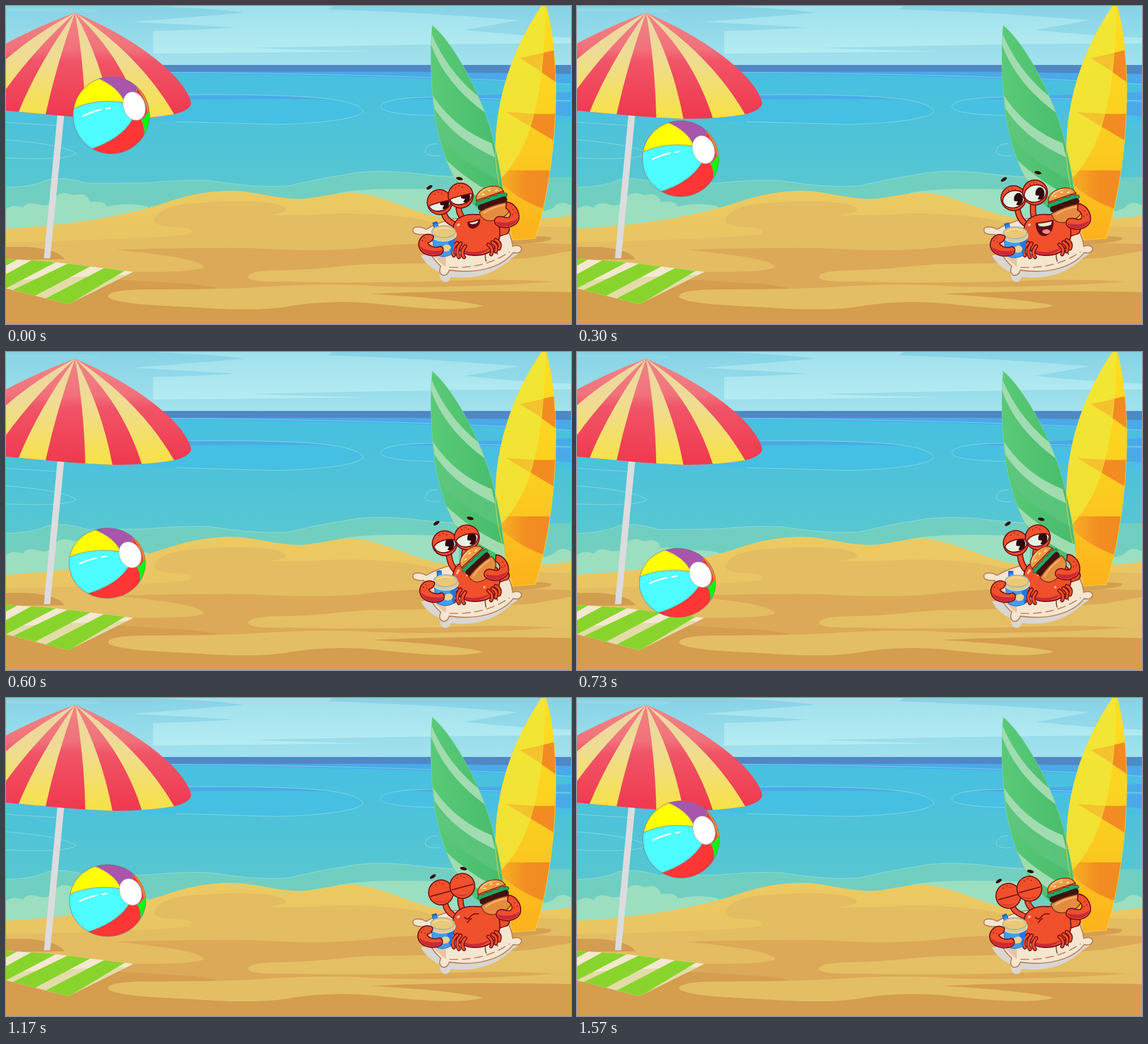
Animation, 998 px wide and 561 px high, one loop 1.6 s. Source, as an HTML page:

```html
<!DOCTYPE html>
<html lang="en">
<head>
<meta charset="utf-8">
<title>Crab on the beach</title>
<style>
html, body { margin: 0; width: 100%; height: 100%; overflow: hidden; }
svg { display: block; width: 100vw; height: 100vh; }
.crab { fill: #f0502b; stroke: #6e0b13; stroke-width: 1.8; stroke-linejoin: round; stroke-linecap: round; }
.dark { fill: #c9283a; }
.line { fill: none; stroke: #6e0b13; stroke-width: 1.8; stroke-linecap: round; }
.foam { fill: none; stroke: #a5e3e6; stroke-width: 1; opacity: .65; }
.pillow { fill: #f5e6d0; stroke: #b67c58; stroke-width: 1.8; }
.seam { fill: none; stroke: #b67c58; stroke-width: 1.7; stroke-linecap: round; }
.bun { stroke: #7a3014; stroke-width: 1.5; }
</style>
</head>
<body>
<svg viewBox="0 0 998 561" preserveAspectRatio="none">
<defs>
  <linearGradient id="sky" x2="0" y2="1"><stop stop-color="#86d3e6"/><stop offset="1" stop-color="#a3e2ed"/></linearGradient>
  <linearGradient id="cloud" x2="0" y2="1"><stop stop-color="#9fe0ed"/><stop offset="1" stop-color="#b5ecf2"/></linearGradient>
  <linearGradient id="sea" x2="0" y2="1"><stop stop-color="#46bfe2"/><stop offset=".4" stop-color="#4fc3d8"/><stop offset="1" stop-color="#62cbc9"/></linearGradient>
  <linearGradient id="sand" gradientUnits="userSpaceOnUse" x1="0" y1="326" x2="0" y2="535"><stop stop-color="#ecca62"/><stop offset="1" stop-color="#e4be64"/></linearGradient>
  <linearGradient id="red" gradientUnits="userSpaceOnUse" x1="0" y1="12" x2="0" y2="190"><stop stop-color="#f18684"/><stop offset=".36" stop-color="#f1717a"/><stop offset=".48" stop-color="#f15467"/><stop offset="1" stop-color="#f03a50"/></linearGradient>
  <linearGradient id="yellow" gradientUnits="userSpaceOnUse" x1="0" y1="12" x2="0" y2="190"><stop stop-color="#ecd5a6"/><stop offset=".45" stop-color="#efdc92"/><stop offset="1" stop-color="#f7e14a"/></linearGradient>
  <linearGradient id="green"><stop stop-color="#5bcb77"/><stop offset="1" stop-color="#45ba6c"/></linearGradient>
  <linearGradient id="gold" x2="0" y2="1"><stop stop-color="#fee020"/><stop offset=".6" stop-color="#fbcb20"/><stop offset="1" stop-color="#fdb01c"/></linearGradient>
  <linearGradient id="orange"><stop stop-color="#f8b323"/><stop offset=".5" stop-color="#f28d22"/><stop offset="1" stop-color="#f28a22"/></linearGradient>
  <clipPath id="canopy"><path d="M122 12C185 38 255 78 300 126Q325 155 327 172Q325 184 297 191Q244 200 188 199Q130 197 70 191L-90 176V105Q-20 80 0 66Q65 32 122 12Z"/></clipPath>
  <clipPath id="towel"><path d="M0 446L80 451L225 469L110 526L0 498Z"/></clipPath>
  <clipPath id="boardA"><path id="shapeA" d="M753 34C790 65 837 150 858 225Q878 300 882 368Q845 375 820 345C785 305 762 240 755 175Q747 90 753 34Z"/></clipPath>
  <clipPath id="boardB"><path id="shapeB" d="M946 0H954C972 65 975 150 967 240Q957 340 935 410L895 413C880 350 862 300 865 240C868 145 905 60 946 0Z"/></clipPath>
  <clipPath id="round"><circle r="67.5"/></clipPath>
  <clipPath id="slitL"><path id="cutL"/></clipPath>
  <clipPath id="slitR"><path id="cutR"/></clipPath>
</defs>

<!-- sky -->
<path d="M0 0H998V106H0Z" fill="url(#sky)"/>
<path d="M223 28L420 12Q380 5 260 0H578L568 6Q720 10 905 25Q860 34 810 42Q900 52 998 56V66Q760 66 435 74Q530 78 650 80L260 84V44Q330 43 405 38Q310 32 223 28Z" fill="url(#cloud)"/>
<path d="M0 6H130Q175 7 155 10L0 8" class="foam"/>

<!-- sea -->
<path d="M0 104H998V420H0Z" fill="url(#sea)"/>
<path d="M0 104H998V120L700 117H0Z" fill="#4f88c5"/>
<path d="M0 116H700L998 120V138Q720 124 260 118Z" fill="#4aaae8"/>
<path d="M240 156L420 157Q540 158 590 168Q440 165 240 167ZM690 165Q740 160 998 152V170Q790 168 675 169Z" fill="#4aaae8"/>
<path d="M240 166Q540 161 590 167Q630 177 631 187Q610 205 480 209L240 202Z" fill="#46c0e2"/>
<path d="M662 179Q664 164 700 164Q850 167 998 167V207Q850 196 690 191Q668 188 662 179Z" fill="#48c0e2"/>
<path d="M870 175Q940 167 998 170V195Q940 190 870 185Z" fill="#4aaae8"/>
<path class="foam" d="M262 117Q720 120 998 138M300 157Q540 154 600 169Q630 177 631 187Q610 205 480 209L300 204M0 205Q55 209 96 211M998 167Q850 164 750 161Q660 162 662 179Q670 192 760 193M0 236Q100 244 124 260Q110 273 0 268M762 243Q742 242 740 258Q746 266 768 264"/>
<path d="M0 320Q48 319 75 306Q100 300 145 313L250 312Q310 306 360 308Q450 322 500 317Q570 301 590 299Q640 287 710 294Q790 304 998 302V400H0Z" fill="#71cfc1"/>
<path class="foam" d="M0 320Q48 319 75 306Q100 300 145 313L250 312Q310 306 360 308Q450 322 500 317Q570 301 590 299Q640 287 710 294Q760 300 790 302"/>
<path d="M0 358Q15 348 30 356Q36 343 60 351Q75 354 82 345Q92 323 120 334Q143 327 148 346Q174 342 178 354Q215 345 250 354L280 395H0ZM586 330Q640 320 740 323L800 325V390H600ZM940 364Q962 360 968 355Q980 341 998 352V390H940Z" fill="#9bdfc0"/>

<!-- sand -->
<path d="M0 393Q120 386 200 368Q250 358 290 344Q345 326 397 326C440 326 480 342 525 340C560 337 580 329 613 329C655 332 700 354 740 366Q800 383 860 377Q930 379 998 370V561H0Z" fill="url(#sand)"/>
<path d="M0 417Q290 410 325 402Q335 393 310 391Q258 389 262 378Q268 355 320 349Q420 340 475 349Q505 358 490 363Q475 369 450 369Q530 370 590 366Q700 366 760 383L998 390V561H0Z" fill="#e4bc62"/>
<path d="M0 425H40Q95 430 103 447L0 448Z" fill="#d29d50"/>
<path d="M194 430Q330 426 430 427Q560 435 640 426Q730 413 998 420V500H0V474Q150 470 225 469Q325 470 349 462Q352 453 300 443Q245 435 194 430Z" fill="#dba957"/>
<path d="M427 478Q428 467 480 466C560 466 600 455 665 455Q760 455 930 444Q998 432 998 432V488Q880 480 780 485Q600 490 500 486Q430 488 427 478Z" fill="#e5bf64"/>
<path d="M0 485Q180 478 260 487Q340 489 375 498L190 510Q210 527 330 531Q450 541 510 528Q620 516 700 525L844 528L998 500V561H0Z" fill="#d59d4e"/>
<path d="M180 513Q180 500 250 500Q360 500 430 497Q560 488 650 494Q800 500 998 484V505Q790 502 645 508Q800 517 843 529Q800 541 680 528Q580 515 500 530Q440 540 320 531Q190 526 180 513Z" fill="#e4be64"/>
<path d="M645 508Q800 500 998 505V561H0V530Q200 524 320 531Q440 540 500 530Q580 515 680 530Q800 541 843 529Q800 517 645 508Z" fill="#d59d4e"/>
<path d="M885 411Q930 403 962 408Q970 414 930 418L890 422Z" fill="#d4a050"/>

<!-- surfboards -->
<g clip-path="url(#boardB)">
  <path d="M860 0H980V420H860Z" fill="url(#gold)"/>
  <path d="M908 92L968 78L972 135Q940 112 908 92ZM884 187Q930 192 972 190V240Q930 215 884 187ZM870 290H964L950 358Q900 340 870 308Z" fill="url(#orange)"/>
  <path d="M952 0Q953 130 926 215Q908 270 873 306L850 270V0Z" fill="#efea3c" opacity=".72"/>
  <path d="M908 92L949 83Q947 103 943 113ZM884 187L932 190Q928 205 923 211Z" fill="#f5c02b" opacity=".8"/>
</g>
<g clip-path="url(#boardA)">
  <path d="M740 30H890V380H740Z" fill="url(#green)"/>
  <path d="M757 185Q800 233 865 265L874 310Q800 270 770 235Z" fill="#62c681" opacity=".65"/>
  <path d="M750 45Q778 114 835 160L846 188Q774 135 750 66ZM754 158Q792 216 858 242L864 267Q790 233 757 181ZM772 266Q820 314 880 340L884 365Q812 330 782 292Z" fill="#a1dcb0"/>
</g>
<use href="#shapeA" fill="none" stroke="#7ad79a" stroke-width=".8"/>
<use href="#shapeB" fill="none" stroke="#f7dc45" stroke-width=".8"/>

<!-- towel and umbrella -->
<g clip-path="url(#towel)">
  <path d="M0 440H230V530H0Z" fill="#f4e8d0"/>
  <path d="M0 485Q80 479 225 474V530H0Z" fill="#e3dca8"/>
  <path d="M0 446H22L0 458ZM46 448L88 452L0 498V473ZM110 454L150 459L48 513L10 502ZM174 462L210 467L110 527L68 517Z" fill="#89d42c"/>
</g>
<path d="M91 190H103L78 445H67Z" fill="#dcdcde"/>
<g clip-path="url(#canopy)"><path d="M-100 0H340V210H-100Z" fill="url(#red)"/><g id="stripes" fill="url(#yellow)"/></g>

<!-- ball -->
<g id="ball">
  <circle r="67.5" fill="#ff3536"/>
  <g clip-path="url(#round)" stroke="#8f9196" stroke-width="1">
    <path d="M-70 -10C-40 -27 0 -29 27 -20Q34 -5 37 8Q16 43 -39 60L-75 50Z" fill="#4dfdff"/>
    <path d="M-75 -8C-40 -26 -5 -27 23 -22Q20 -48 -22 -65L-75 -75Z" fill="#ffff00"/>
    <path d="M-24 -65Q12 -50 23 -24Q28 -40 44 -40L46 -49L20 -75Z" fill="#a855ac"/>
    <path d="M42 -54Q52 -40 58 -27Q65 -12 64 2H80V-55Z" fill="#ff8516"/>
    <path d="M58 5Q63 -6 72 -8V30L56 42Q62 23 52 7Z" fill="#00ff00"/>
    <path d="M40 -41Q57 -22 57 8" fill="none"/>
  </g>
  <ellipse cx="40.5" cy="-16" rx="19" ry="25.5" transform="rotate(-19 40.5 -16)" fill="#fff" stroke="#aaa" stroke-width=".8"/>
  <path d="M-49 1Q-35 -6 -19 -10M-9 -11.500L-2 -13" fill="none" stroke="#fff" stroke-width="3" stroke-linecap="round"/>
  <circle r="67.5" fill="none" stroke="#777" stroke-width=".8"/>
</g>

<!-- pillow -->
<path d="M733 440Q742 458 766 470Q766 490 781 486L786 478Q850 486 893 445L905 437L880 420Z" fill="#d9d6d3"/>
<path class="pillow" d="M738 403Q728 404 720 400Q716 392 724 390Q734 389 742 394C790 365 860 368 882 390Q893 405 895 424Q908 420 911 428Q909 438 896 435C875 462 830 473 783 466Q780 476 771 475Q763 470 768 459Q744 438 738 403Z"/>
<path class="seam" d="M784 461Q845 464 889 434" stroke-dasharray="14 8"/>
<path d="M740 414Q752 440 771 456L777 460V430Z" fill="#e7c4a4"/>
<path class="seam" d="M848 450Q844 437 850 430M868 438Q866 432 870 428" style="stroke:#6e3b28"/>

<!-- eye stalks, arm, body -->
<path id="stalkA" fill="none" stroke="#6e0b13" stroke-width="11"/>
<path id="stalkB" fill="none" stroke="#f0502b" stroke-width="7.500"/>
<path class="crab" d="M862 398Q872 386 887 388Q892 396 885 402Q873 405 864 410Z"/>
<g id="eyes"></g>
<path class="crab" d="M790 390C793 373 811 366 832 368C855 367 871 378 872 395C875 422 857 441 826 440C802 440 783 420 790 390Z"/>
<path d="M798 425Q824 443 858 425Q842 440 822 439Q805 437 798 425Z" class="dark"/>
<ellipse cx="799" cy="386" rx="3" ry="2" fill="#ffc5a5" transform="rotate(-35 799 386)"/>
<g id="legs"></g>
<g id="mouth">
  <path id="hole" fill="#5d0d18" stroke="#6e0b13" stroke-width="1.6"/>
  <path id="teeth" fill="#d9f0d4"/>
  <ellipse id="tongue" fill="#f58c80"/>
</g>
<path id="frown" class="line" d="M810 387Q816 393 820 386Q825 379 834 381M815 396Q818 391 822 389"/>

<g id="burger">
  <path class="bun" d="M-25 -13C-25 -34 24 -34 25 -13Z" fill="#f09a45"/>
  <path d="M-17 -21Q-8 -28 5 -26" fill="none" stroke="#f8c171" stroke-width="3" stroke-linecap="round"/>
  <path d="M-12 -19h3M1 -22h3M12 -18h3" stroke="#fff0c8" stroke-width="2" stroke-linecap="round"/>
  <path d="M-26 -13H26L24 -7H-25Z" fill="#e94b2c" stroke="#6e1b12"/>
  <path d="M-29 -7Q-24 -14 -18 -9Q-10 -13 -4 -9Q5 -14 10 -9Q18 -14 23 -9Q31 -10 29 -3Q20 1 15 -4Q8 2 1 -4Q-7 2 -13 -3Q-24 2 -29 -7Z" fill="#1fa866" stroke="#0e633f"/>
  <rect x="-27" y="-4" width="54" height="11" rx="5" fill="#42120f"/>
  <path d="M-26 8H26L17 10L8 14L-2 9Z" fill="#f8bf42"/>
  <path class="bun" d="M-27 8C-29 25 -16 31 0 31C17 31 29 25 27 8Q0 3 -27 8Z" fill="#e58c40"/>
  <path d="M-20 12Q0 7 19 11" fill="none" stroke="#f6b36b" stroke-width="2.500" stroke-linecap="round"/>
</g>
<g id="crumbs" fill="#f2c985"><circle cx="797" cy="390" r="2"/><circle cx="814" cy="394" r="1.600"/><circle cx="845" cy="415" r="2"/></g>
<g id="clawR">
  <path class="crab" d="M-2 -23C11 -23 22 -8 20 7C16 20 -3 26 -17 19C-25 15 -25 7 -18 3C-10 0 -5 6 2 4C7 0 5 -8 -3 -12Z"/>
  <path class="dark" d="M18 6Q3 17 -21 11Q-18 19 -7 20Q13 20 18 6Z"/>
  <path d="M9 -11l1 2M13 -5l1 2M8 -2l1 2" stroke="#8f1717" stroke-width="1.500"/>
</g>

<g id="cup">
  <g id="straw"><path d="M-3.500 -20H4V4H-3.500Z" fill="#318ded" stroke="#1d57ad" stroke-width="1.300"/><ellipse cx=".2" cy="-19" rx="3.500" ry="2" fill="#2467c7"/></g>
  <path d="M-21 5L-15 39Q0 47 14 39L21 5Z" fill="#419df0" stroke="#2770c4" stroke-width="1.300"/>
  <path d="M8 17L13 39L14 39L20 10Z" fill="#2675dc"/>
  <ellipse cx="5" cy="28" rx="8" ry="6" fill="#ecd18c" transform="rotate(-15 5 28)"/>
  <ellipse cy="4" rx="22.500" ry="12" fill="#dcc98f" stroke="#cfe0df" stroke-width="1.400"/>
  <ellipse cy="-1" rx="21" ry="10.500" fill="#eac878" stroke="#8faeba" stroke-width="1.300"/>
  <path d="M-16 -3Q-3 -11 13 -5" fill="none" stroke="#f5e6b9" stroke-width="1.300"/>
</g>
<g id="clawL">
  <path class="crab" d="M752 404C739 399 728 410 729 423C732 438 750 444 766 439C775 435 774 425 767 424C759 428 748 424 745 418Q753 416 755 409Q756 405 752 404Z"/>
  <path class="dark" d="M731 424Q745 435 771 431Q769 437 761 439Q738 441 731 424Z"/>
  <path d="M735 413l1 2M739 409l1 1M741 415l1 1" stroke="#8f1717" stroke-width="1.700"/>
</g>
<g id="brows" fill="#35080d"><ellipse id="browL" rx="6" ry="2.800"/><ellipse id="browR" rx="6" ry="2.800"/></g>
</svg>

<script>
const LOOP = 1600, LAST = 1570;
const $ = id => document.getElementById(id);
const set = (id, name, value) => $(id).setAttribute(name, value);
const place = (id, x, y, rot = 0, extra = '') =>
  set(id, 'transform', `translate(${x} ${y}) rotate(${rot}) ${extra}`);

const times = [0, 300, 470, 730, 970, 1170, LAST];
const keys = {
  ballX: [186, 183, 180.5, 177.5, 177, 179.5, 184],
  ballY: [192.5, 269, 328, 407, 417, 357.5, 249.5],
  ballR: [68, 67, 64, 61, 61, 63.5, 68],
  eyeLX: [766, 771, 775, 775, 773, 768.5, 762],
  eyeLY: [346, 339, 338, 337, 340, 343, 349],
  eyeRX: [803, 809, 814, 814, 811, 806, 799],
  eyeRY: [334.5, 329, 327.5, 327, 331, 331.5, 336.5],
  lidTop: [0, -18, -8, -8, 0, 2, 2],
  lidBottom: [20, 22, 21, 20, 9, 2, 2],
  browLX: [748, 754, 759, 761, 762, 754, 745],
  browLY: [320, 306, 302, 303, 311, 315, 323],
  browRX: [801, 814, 820, 820, 817, 808, 801],
  browRY: [304.5, 294, 293, 295, 302, 301, 306],
  burgerX: [859, 861, 838, 831, 838, 862, 860],
  burgerY: [347, 350, 369, 373, 370, 350, 347],
  burgerRot: [-19, -19, -35, -46, -37, -20, -19],
  clawX: [886, 887, 870, 868, 871, 889, 887],
  clawY: [369, 372, 382, 380, 382, 371, 369],
  cupX: [773, 774, 775.5, 777, 776.5, 771, 773],
  cupY: [399, 401, 403, 405, 404, 399, 399],
  strawX: [-10, -10, -10, -11, -11, -10, -11],
  strawRot: [-17, -16, -10, 0, 0, -14, -22],
  grip: [0, 1, 1.5, 2, 1.5, -1.5, 0],
  mouth: [.25, 1, .8, .4, .1, 0, 0]
};

// Hermite curve through the keys; turning points stay flat unless loose.
function curve(v, t, loose) {
  let i = 0;
  while (i < times.length - 2 && t >= times[i + 1]) i++;
  const slope = k => {
    const a = Math.max(k - 1, 0), b = Math.min(k + 1, v.length - 1);
    if (!loose && a < k && k < b && (v[k] - v[a]) * (v[b] - v[k]) <= 0) return 0;
    return (v[b] - v[a]) / (times[b] - times[a]);
  };
  const d = times[i + 1] - times[i], s = (t - times[i]) / d, r = 1 - s;
  return v[i] * r * r * (1 + 2 * s) + v[i + 1] * s * s * (3 - 2 * s) +
    d * s * r * (slope(i) * r - slope(i + 1) * s);
}

function buildStripes() {
  const edges = [
    [-65, 160, 10, 70], [-22, 178, 40, 85], [23, 185, 58, 100], [70, 191, 90, 100],
    [140, 197, 138, 100], [188, 199, 168, 95], [240, 198, 205, 88], [297, 191, 235, 85]
  ];
  let out = '';
  for (let i = 0; i < edges.length; i += 2) {
    const [x, y, cx, cy] = edges[i], [X, Y, CX, CY] = edges[i + 1];
    out += `<path d="M122 12Q${cx} ${cy} ${x} ${y}L${x} ${y + 9}L${X} ${Y + 9}V${Y}Q${CX} ${CY} 122 12Z"/>`;
  }
  $('stripes').innerHTML = out;
}

function buildCrab() {
  const legs = [
    'M797 418Q785 428 791 440', 'M803 419Q793 431 800 443', 'M811 424Q802 435 809 443',
    'M852 421Q862 428 857 438', 'M859 417Q870 423 865 433', 'M865 413Q875 418 871 428'
  ];
  const stroke = (d, color, w) =>
    `<path d="${d}" fill="none" stroke="${color}" stroke-width="${w}" stroke-linecap="round"/>`;
  $('legs').innerHTML = legs.map(d => stroke(d, '#6e0b13', 7) + stroke(d, '#f0502b', 3.8)).join('');
  $('eyes').innerHTML = ['L', 'R'].map(s => `<g id="eye${s}">
    <circle class="crab" r="22"/>
    <path d="M-18 9Q-4 24 16 13Q1 22 -18 9Z" class="dark"/>
    <path d="M-6 -16l2 1M1 -18l2 1M6 -14l2 1" stroke="#941b18" stroke-width="1.6"/>
    <path id="white${s}" fill="#e5f3e4"/>
    <g clip-path="url(#slit${s})"><g id="pupil${s}">
      <ellipse rx="8" ry="11" fill="#2d090d"/><path d="M-9 3L-1 4L-5 11Z" fill="#e5f3e4"/>
    </g></g>
    <path id="rim${s}" class="line"/></g>`).join('');
}

function drawEye(side, x, y, top, bottom) {
  top = Math.min(top, bottom);
  const d = `M-20 2C-17 ${top} 17 ${top} 20 2C17 ${bottom} -17 ${bottom} -20 2Z`;
  for (const id of ['white', 'cut', 'rim']) set(id + side, 'd', d);
  place('eye' + side, x, y, -15);
  place('pupil' + side, 8, 4, 15);
}

function draw(ms) {
  const t = Math.min(ms, LAST), k = {};
  for (const name in keys) k[name] = curve(keys[name], t, name === 'ballY');

  place('ball', k.ballX, k.ballY, 0, `scale(1 ${k.ballR / 67.5})`);

  const stalks = `M${k.eyeLX + 7} ${k.eyeLY + 17}Q${k.eyeLX + 9} 379 797 387` +
    `M${k.eyeRX - 3} ${k.eyeRY + 18}Q${k.eyeRX - 5} 364 808 376`;
  set('stalkA', 'd', stalks);
  set('stalkB', 'd', stalks);
  drawEye('L', k.eyeLX, k.eyeLY, k.lidTop, k.lidBottom);
  drawEye('R', k.eyeRX, k.eyeRY, k.lidTop, k.lidBottom);
  place('browL', k.browLX, k.browLY, -33);
  place('browR', k.browRX, k.browRY, 12);

  const m = k.mouth, w = 9 + 6 * m, h = 7 + 21 * m, y = 379 + m * 2;
  set('hole', 'd', `M${826 - w} ${y + 2}Q826 ${y + 1} ${826 + w} ${y - 3}C${828 + w} ${y + h} ${827 - w} ${y + h + 8} ${826 - w} ${y + 2}Z`);
  set('teeth', 'd', `M${829 - w} ${y + 3}Q826 ${y + 2} ${824 + w} ${y - 1}L${822 + w} ${y + 2 + 3 * m}Q826 ${y + 6 + 4 * m} ${831 - w} ${y + 4 + 3 * m}Z`);
  set('tongue', 'cx', 829);
  set('tongue', 'cy', y + 17 * m);
  set('tongue', 'rx', 7 * m);
  set('tongue', 'ry', 4 * m);
  $('mouth').style.display = m > .06 ? '' : 'none';
  $('frown').style.display = m > .06 ? 'none' : '';
  $('crumbs').style.display = t > 440 && t < 1080 ? '' : 'none';

  place('burger', k.burgerX, k.burgerY, k.burgerRot);
  place('clawR', k.clawX, k.clawY);
  place('cup', k.cupX, k.cupY);
  place('straw', k.strawX, 2, k.strawRot);
  place('clawL', k.grip, k.grip / 2);
}

buildStripes();
buildCrab();
const start = performance.now();
function tick() {
  draw((performance.now() - start) % LOOP);
  requestAnimationFrame(tick);
}
tick();
</script>
</body>
</html>
```
